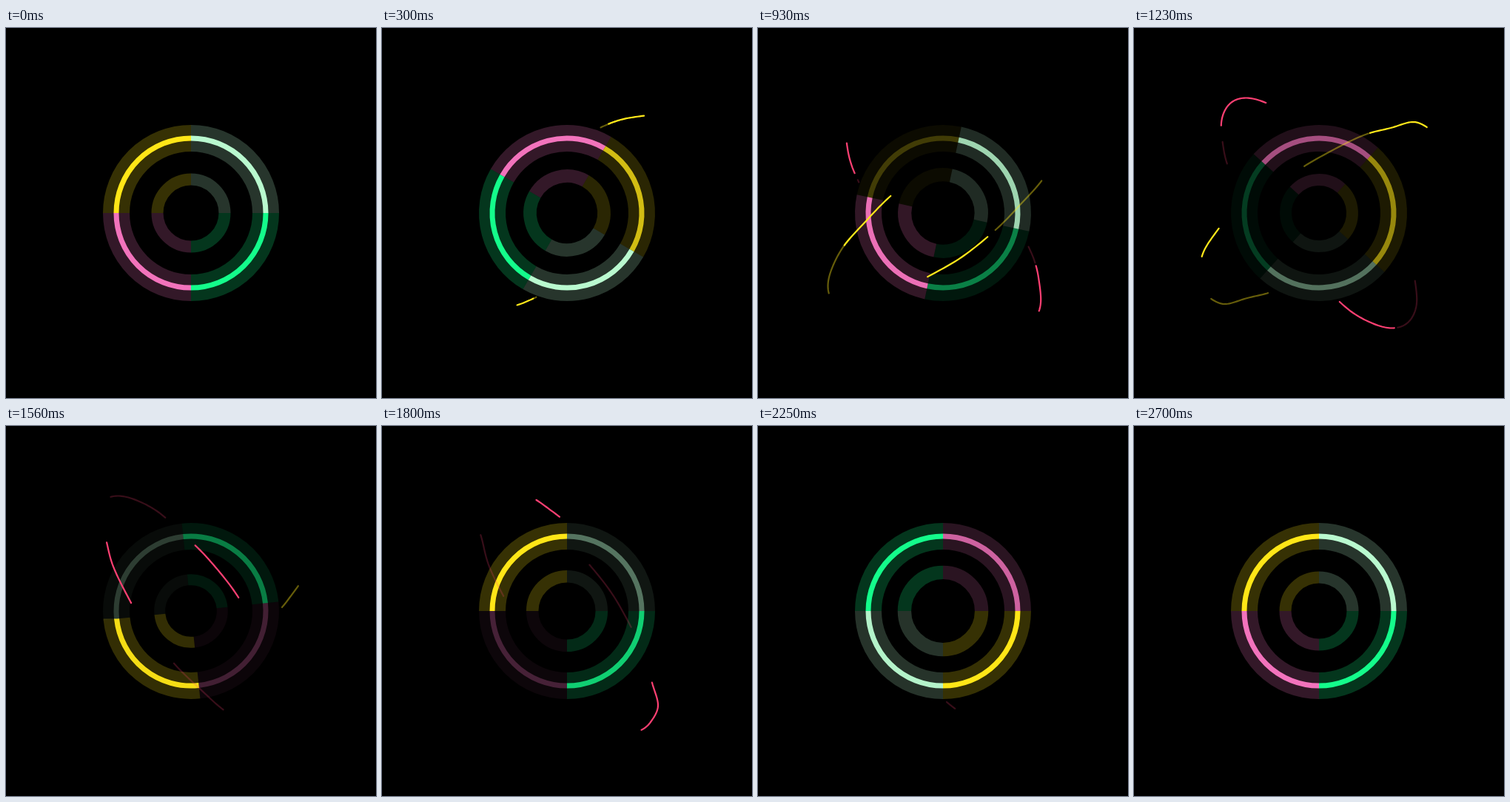
An HTML page with a canvas that plays this animation: 500 by 500 pixels, repeating every 2.76 s.

```html
<!DOCTYPE html>
<html lang="en">
<head>
<meta charset="utf-8">
<title>Spinning rings</title>
<style>
  html, body { margin: 0; width: 100%; height: 100%; overflow: hidden; background: #000; }
  canvas { display: block; width: 500px; height: 500px; }
</style>
</head>
<body>
<canvas id="stage" width="500" height="500"></canvas>
<script>
const ctx = document.getElementById('stage').getContext('2d');
const LOOP = 2760, STEP = 30, LAST = 2700;
const TAU = Math.PI * 2;

// Ring quarters, clockwise from the right; each one fades down and back once
const quarters = [
  { color: '#14fc8b', fadeAt: 410 },
  { color: '#f273bc', fadeAt: 830 },
  { color: '#ffe617', fadeAt: 10 },
  { color: '#b9f9cf', fadeAt: 670 }
];
const FADE = 1680;

// Inner ring radius: turning points as [time, outer radius]
const pulse = [[0, 53.5], [630, 65], [1500, 49.5], [2145, 62], [2700, 53.5]];

// Streak route relative to the centre, repeated at quarter turns
const route = smooth([
  [40, -113], [63, -123], [87, -129], [122, -132], [145, -123], [155, -105],
  [152, -80], [135, -46], [106, -13], [73, 21], [29, 57], [-13, 82], [-60, 105],
  [-97, 115], [-128, 123], [-150, 113], [-161, 100], [-164, 85], [-159, 61],
  [-151, 43], [-131, 15], [-123, 5]
]);
const ROUTE = 661;

// Distances of head and tail along the route, one value per KNOT ms
const KNOT = 240;
const runs = [
  [[0, 50, 128, 235, 424, 625, 700], [0, 10, 56, 150, 328, 575, 690]],
  [[0, 16, 88, 178, 308, 510, 660, 700], [0, 2, 29, 92, 217, 425, 633, 700]],
  [[0, 1, 30, 100, 228, 425, 615, 690], [0, 0, 13, 54, 143, 325, 560, 665, 700]]
];

const YELLOW = '#ffe81a', ROSE = '#ff4073';
const streaks = [
  { run: 1, turn: 0, color: YELLOW, alpha: .4, delay: 0 },
  { run: 2, turn: 2, color: YELLOW, alpha: .4, delay: 0 },
  { run: 1, turn: 1, color: ROSE, alpha: .22, delay: 630 },
  { run: 2, turn: 3, color: ROSE, alpha: .22, delay: 630 },
  { run: 0, turn: 0, color: YELLOW, alpha: 1, delay: 0 },
  { run: 1, turn: 2, color: YELLOW, alpha: 1, delay: 0 },
  { run: 0, turn: 1, color: ROSE, alpha: 1, delay: 540 },
  { run: 1, turn: 3, color: ROSE, alpha: 1, delay: 540 }
];

function clamp(v, lo, hi) { return Math.min(hi, Math.max(lo, v)); }

function ease(x) { return (1 - Math.cos(Math.PI * x)) / 2; }

function spline(a, b, c, d, x) {
  return b + x / 2 * (c - a + x * (2 * a - 5 * b + 4 * c - d + x * (3 * (b - c) + d - a)));
}

function sample(list, pos) {
  const i = Math.floor(pos), last = list.length - 1;
  const at = k => list[clamp(k, 0, last)];
  return spline(at(i - 1), at(i), at(i + 1), at(i + 2), pos - i);
}

// Dense polyline with running length
function smooth(points) {
  const xs = points.map(p => p[0]), ys = points.map(p => p[1]);
  const out = [];
  let len = 0;
  for (let k = 0; k <= (points.length - 1) * 12; k++) {
    const x = sample(xs, k / 12), y = sample(ys, k / 12);
    if (k) len += Math.hypot(x - out[k - 1].x, y - out[k - 1].y);
    out.push({ x, y, len });
  }
  return out;
}

function pointAt(s) {
  let i = 1;
  while (i < route.length - 1 && route[i].len < s) i++;
  const a = route[i - 1], b = route[i];
  const k = (s - a.len) / (b.len - a.len);
  return { x: a.x + (b.x - a.x) * k, y: a.y + (b.y - a.y) * k };
}

function innerRadius(t) {
  let i = 1;
  while (i < pulse.length - 1 && pulse[i][0] < t) i++;
  const [t0, r0] = pulse[i - 1], [t1, r1] = pulse[i];
  return r0 + (r1 - r0) * ease((t - t0) / (t1 - t0));
}

function arc(radius, width, from, alpha) {
  ctx.globalAlpha = alpha;
  ctx.lineWidth = width;
  ctx.beginPath();
  ctx.arc(0, 0, radius, from, from + TAU / 4);
  ctx.stroke();
}

function drawRings(t) {
  const spin = t / 900 * TAU;
  const outer = innerRadius(t);
  ctx.lineCap = 'butt';
  quarters.forEach(({ color, fadeAt }, i) => {
    const alpha = 1 - .8 * ease(2 * clamp((t - fadeAt) / FADE, 0, 1));
    const from = spin + i * TAU / 4;
    ctx.strokeStyle = color;
    arc(101, 36, from, .21 * alpha);
    arc(outer * .85, outer * .3, from, .21 * alpha);
    arc(101, 7, from, alpha);
  });
}

function drawStreak({ run, turn, color, alpha, delay }, t) {
  const pos = (t - delay) / KNOT;
  if (pos <= 0) return;
  const total = route[route.length - 1].len;
  const [head, tail] = runs[run].map(list => clamp(sample(list, pos) / ROUTE, 0, 1) * total);
  if (head - tail < .5) return;
  const a = pointAt(tail), b = pointAt(head);
  ctx.save();
  ctx.rotate(turn * TAU / 4);
  ctx.globalAlpha = alpha;
  ctx.strokeStyle = color;
  ctx.lineWidth = 2.2;
  ctx.lineCap = ctx.lineJoin = 'round';
  ctx.beginPath();
  ctx.moveTo(a.x, a.y);
  for (const p of route) if (p.len > tail && p.len < head) ctx.lineTo(p.x, p.y);
  ctx.lineTo(b.x, b.y);
  ctx.stroke();
  ctx.restore();
}

function draw(t) {
  ctx.setTransform(1, 0, 0, 1, 0, 0);
  ctx.globalAlpha = 1;
  ctx.fillStyle = '#000';
  ctx.fillRect(0, 0, 500, 500);
  ctx.translate(250, 250);
  drawRings(t);
  streaks.forEach(s => drawStreak(s, t));
}

const start = performance.now();
function tick() {
  const t = (performance.now() - start) % LOOP;
  draw(Math.min(LAST, Math.floor(t / STEP) * STEP));
  requestAnimationFrame(tick);
}
tick();
</script>
</body>
</html>
```
